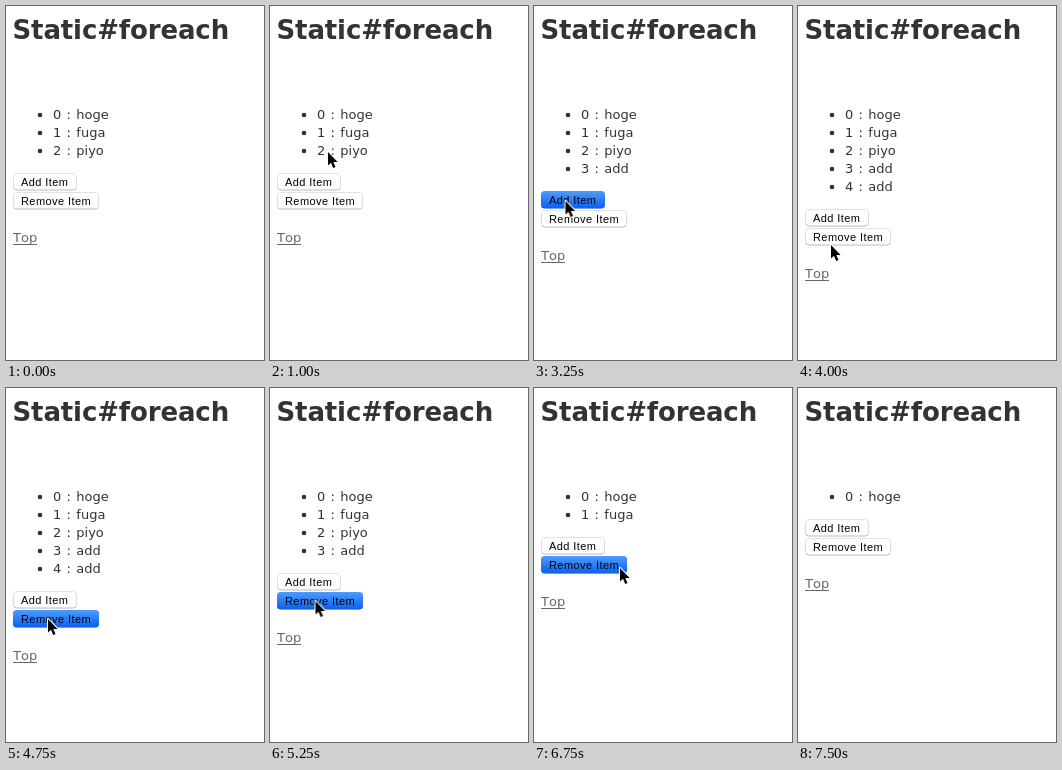
Write an HTML page that moves like this. It is 258 px wide and 354 px high and loops after 8250 ms.

```html
<!DOCTYPE html>
<html lang="en">
<head>
<meta charset="utf-8">
<title>Static#foreach</title>
<style>
html, body { margin: 0; width: 100%; height: 100%; overflow: hidden; background: #fff; }
svg { display: block; width: 258px; height: 354px; }
text { font: 13px "DejaVu Sans", sans-serif; font-kerning: none; fill: #333; white-space: pre; }
.title { font-size: 26px; font-weight: bold; letter-spacing: -.13px; }
.rows text { word-spacing: 1.2px; }
.rows circle { fill: #333; }
.link { fill: #666; }
.btn text { font: 11px "Liberation Sans", Arial, sans-serif; letter-spacing: .43px; fill: #000; }
.face { fill: #fff; stroke: url(#edge); }
.down { fill: url(#blue); }

/* 33 ticks of 250 ms */
.controls, .down, .cursor { animation: 8.25s step-end infinite; }
.controls { animation-name: flow; }
.add .down { animation-name: add; }
.remove .down { animation-name: remove; }
.cursor { animation-name: point; }

@keyframes flow {
  0% { transform: translateY(0); }
  30.303% { transform: translateY(18px); }
  42.424% { transform: translateY(36px); }
  60.606% { transform: translateY(18px); }
  66.666% { transform: translateY(0); }
  75.757% { transform: translateY(-18px); }
  84.848%, 100% { transform: translateY(-36px); }
}
@keyframes add {
  0%, 42.424%, 100% { opacity: 0; }
  39.393% { opacity: 1; }
}
@keyframes remove {
  0%, 60.606%, 66.666%, 75.757%, 84.848%, 100% { opacity: 0; }
  57.575%, 63.636%, 72.727%, 81.818% { opacity: 1; }
}
@keyframes point {
  0% { transform: translate(-30px, -30px); }
  6.06% { transform: translate(131px, 108px); }
  9.09% { transform: translate(98px, 122px); }
  12.121% { transform: translate(58px, 146px); }
  15.151% { transform: translate(29.5px, 167px); }
  18.181% { transform: translate(31.5px, 174px); }
  21.212% { transform: translate(31.5px, 182px); }
  36.363% { transform: translate(31.5px, 195px); }
  45.454% { transform: translate(32px, 220px); }
  48.484% { transform: translate(33px, 239px); }
  54.545% { transform: translate(42px, 231px); }
  63.636% { transform: translate(45.5px, 213px); }
  69.696% { transform: translate(50.5px, 199px); }
  78.787% { transform: translate(72px, 184px); }
  81.818% { transform: translate(86px, 180px); }
  87.878% { transform: translate(206px, 13px); }
  90.909%, 100% { transform: translate(-30px, -30px); }
}
</style>
</head>
<body>
<svg viewBox="0 0 258 354">
  <defs>
    <linearGradient id="edge" x2="0" y2="1">
      <stop stop-color="#e2e2e2"/>
      <stop offset=".8" stop-color="#d6d6d6"/>
      <stop offset="1" stop-color="#b8b8b8"/>
    </linearGradient>
    <linearGradient id="blue" x2="0" y2="1">
      <stop stop-color="#4f9cfa"/>
      <stop offset="1" stop-color="#0a5ff0"/>
    </linearGradient>
  </defs>

  <text class="title" x="6.5" y="33">Static#foreach</text>

  <g class="rows">
    <circle cx="34" cy="109" r="2.3"/><text x="47" y="113">0 : hoge</text>
    <circle cx="34" cy="127" r="2.3"/><text x="47" y="131">1 : fuga</text>
    <circle cx="34" cy="145" r="2.3"/><text x="47" y="149">2 : piyo</text>
    <circle cx="34" cy="163" r="2.3"/><text x="47" y="167">3 : add</text>
    <circle cx="34" cy="181" r="2.3"/><text x="47" y="185">4 : add</text>
  </g>

  <!-- the white sheet hides the rows below the current end of the list -->
  <g class="controls">
    <rect y="154" width="258" height="260" fill="#fff"/>
    <g class="btn add">
      <rect class="face" x="7.5" y="167.5" width="63" height="16.5" rx="3.5"/>
      <rect class="down" x="7" y="167" width="64" height="17.5" rx="3.5"/>
      <text x="15" y="180">Add Item</text>
    </g>
    <g class="btn remove">
      <rect class="face" x="7.5" y="186.5" width="85" height="16.5" rx="3.5"/>
      <rect class="down" x="7" y="186" width="86" height="17.5" rx="3.5"/>
      <text x="15" y="199">Remove Item</text>
    </g>
    <text class="link" x="7" y="236">Top</text>
    <rect class="link" x="7" y="238" width="24" height="1"/>
  </g>

  <path class="cursor" d="M0 0V13.5L3 10.7L5.2 16L7.5 15L5.3 9.9H9.6Z"
    fill="#000" stroke="#fff" stroke-width="2" stroke-linejoin="round" paint-order="stroke"/>
</svg>
</body>
</html>
```
